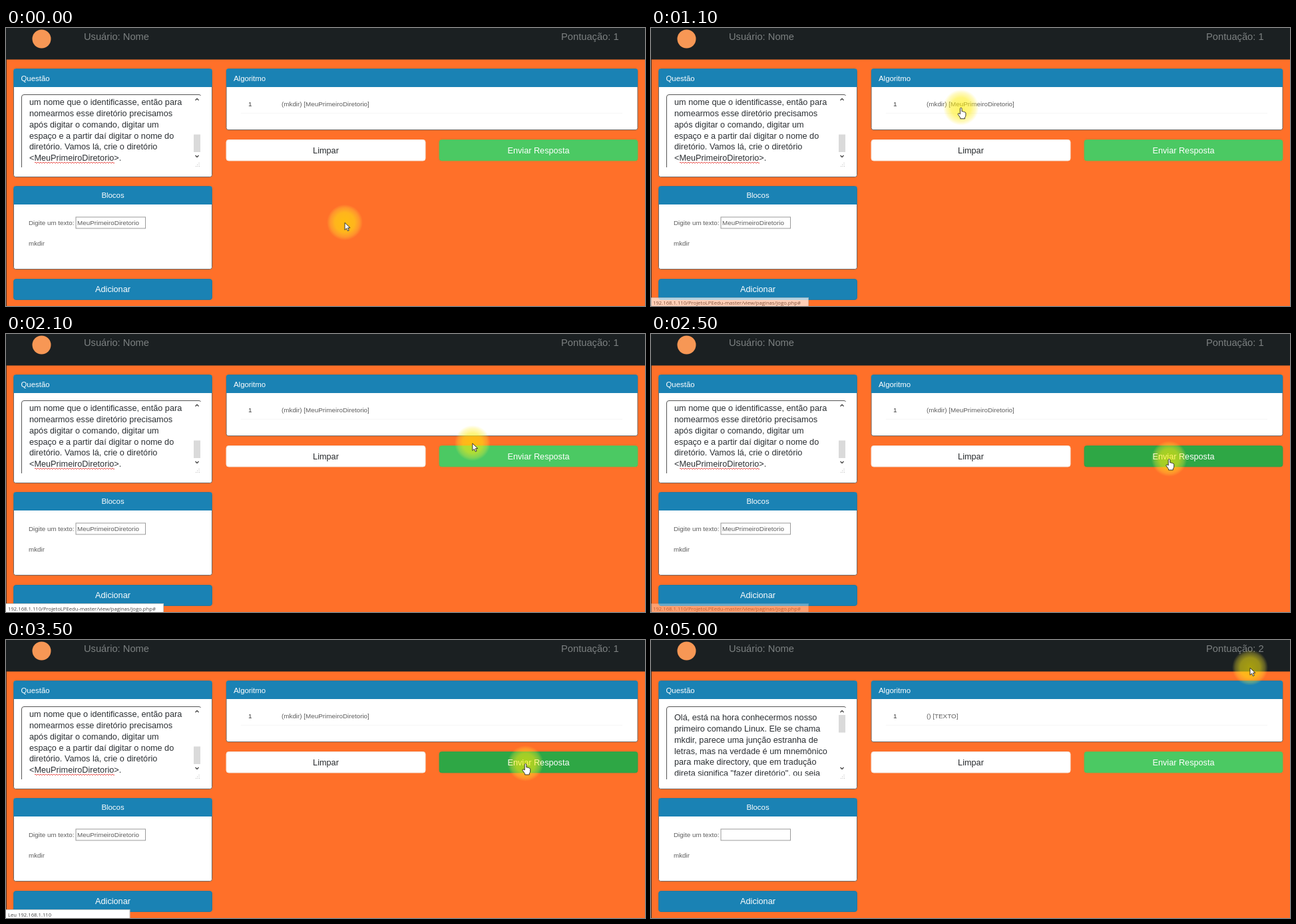
Write an HTML page that moves like this. It is 960 px wide and 419 px high and loops after 5100 ms.

```html
<!DOCTYPE html>
<html lang="pt">
<head>
<meta charset="utf-8">
<style>
  html, body { margin: 0; width: 100%; height: 100%; overflow: hidden; background: #ff7029; }
  svg { display: block; width: 960px; height: 419px; }
  text { font-family: "Liberation Sans", Arial, sans-serif; white-space: pre; }
  .nav { font-size: 14.7px; fill: #7c8081; }
  .head { font-size: 11.4px; fill: #fff; }
  .body { font-size: 12.7px; fill: #2b2f33; }
  .small { font-size: 9.85px; fill: #5c5c5c; }
  .btn { font-size: 12.7px; text-anchor: middle; fill: #fff; }
  .status text { font-family: "Open Sans", "Noto Sans", sans-serif; font-size: 7.7px; fill: #444; }
  .status rect { fill: #fff; stroke: #c4c4c4; }
</style>
</head>
<body>
<svg viewBox="0 0 960 419">
  <defs>
    <radialGradient id="glow">
      <stop offset="0" stop-color="#ffed00" stop-opacity=".62"/>
      <stop offset=".55" stop-color="#ffed12" stop-opacity=".55"/>
      <stop offset=".82" stop-color="#ffed30" stop-opacity=".3"/>
      <stop offset="1" stop-color="#ffed40" stop-opacity="0"/>
    </radialGradient>
    <clipPath id="textArea"><path d="M24 106.500H281V204.500H24Z"/></clipPath>
  </defs>

  <rect width="960" height="419" fill="#ff7029"/>
  <path d="M.5 47V419" stroke="#4a3024"/>
  <rect width="960" height="47.500" fill="#1b2022"/>
  <circle cx="53.500" cy="16.500" r="14" fill="#f79755"/>
  <text class="nav" x="117" y="18">Usuário: Nome</text>
  <text class="nav" id="score" x="834" y="18"></text>

  <g id="panels"></g>
  <text class="head" x="22.500" y="79.500">Questão</text>
  <text class="head" x="342" y="79.500">Algoritmo</text>
  <text class="head" x="160.500" y="256" text-anchor="middle">Blocos</text>

  <path d="M23.500 210V104Q23.500 100.500 27 100.500H290Q292 100.500 292.500 102" fill="none" stroke="#555"/>
  <g clip-path="url(#textArea)">
    <g class="body" id="pageA"></g>
    <g class="body" id="pageB"></g>
  </g>
  <path id="squiggle" fill="none" stroke="#e8403c" stroke-width=".9"/>
  <rect id="thumb" x="282" width="10" height="26.500" fill="#dadada"/>
  <path d="M284.500 109L287 106.500L289.500 109M284.500 192L287 194.500L289.500 192" fill="none" stroke="#444" stroke-width="1.300"/>
  <path d="M285 208.500H292M287 206H292M289.500 203.500H292" stroke="#bbb" stroke-dasharray="1 1.500"/>

  <text class="small" x="34" y="297">Digite um texto:</text>
  <rect x="105" y="285" width="104.500" height="17" fill="#fff" stroke="#9a9a9a"/>
  <text class="small" id="input" x="107" y="297">MeuPrimeiroDiretorio</text>
  <text class="small" x="34" y="327.500">mkdir</text>

  <text class="small" x="364" y="118" style="fill:#333">1</text>
  <text class="small" id="step" x="414" y="118"></text>
  <path d="M353 128.500H926" stroke="#f6f6f6"/>

  <rect id="clear" x="331" y="168.500" width="299" height="31.500" rx="3.500" stroke="#f2e9e4"/>
  <text class="btn" x="480.500" y="189" style="fill:#26292c">Limpar</text>
  <rect id="send" x="651" y="168.500" width="298" height="31.500" rx="3.500"/>
  <text class="btn" x="800" y="189">Enviar Resposta</text>
  <rect x="11.500" y="378.500" width="298" height="31" rx="3.500" fill="#1a82b4" stroke="#2d7698"/>
  <text class="btn" x="160.500" y="398">Adicionar</text>

  <g class="status" id="link">
    <rect x="-.5" y="406.500" width="237" height="14"/>
    <text x="3" y="416.500">192.168.1.110/ProjetoLPEedu-master/view/paginas/jogo.php#</text>
  </g>
  <g class="status" id="read">
    <rect x="-.5" y="406.500" width="186.500" height="14"/>
    <text x="3" y="416.500">Leu 192.168.1.110</text>
  </g>

  <g id="pointer">
    <circle r="27" fill="url(#glow)"/>
    <path id="arrow" d="M0 .5V11.300L2.600 8.900L4.400 12.800L6.200 12L4.500 8.200H8Z" fill="#fff" stroke="#222" stroke-width=".9"/>
    <path id="hand" d="M-1.300 10V1.800Q-1.200 .5 0 .5Q1.200 .5 1.300 1.800V6Q2.800 5.300 3.600 6.500Q5 6 5.600 7.300Q7 7 7.200 8.500V12Q7 14 5.800 15V17H-1V15.500L-4.500 10.500Q-4.800 8.500-3 9Z" fill="#fff" stroke="#222" stroke-width=".9"/>
  </g>
</svg>
<script>
const LOOP = 5100, STEP = 100, RELOAD = 4500;
const $ = id => document.getElementById(id);

const panel = (x, y, w, h) => `
  <rect x="${x}" y="${y}" width="${w}" height="${h}" rx="3" fill="#fff" stroke="#6d6460"/>
  <path d="M${x} ${y + 27.5}v-24.5q0-3 3-3h${w - 6}q3 0 3 3v24.500z" fill="#1a82b4"/>`;
$('panels').innerHTML = panel(11.5, 61.5, 298, 163) + panel(11.5, 238.5, 298, 125) + panel(331, 61.5, 618, 92);

const lines = (rows, y) => rows.map((row, i) =>
  `<text x="35" y="${y + i * 16.75}">${row}</text>`).join('');
$('pageA').innerHTML = lines([
  'um nome que o identificasse, então para',
  'nomearmos esse diretório precisamos',
  'após digitar o comando, digitar um',
  'espaço e a partir daí digitar o nome do',
  'diretório. Vamos lá, crie o diretório',
  '&lt;MeuPrimeiroDiretorio&gt;.'], 116.3);
$('pageB').innerHTML = lines([
  'Olá, está na hora conhecermos nosso',
  'primeiro comando Linux. Ele se chama',
  'mkdir, parece uma junção estranha de',
  'letras, mas na verdade é um mnemônico',
  'para make directory, que em tradução',
  'direta significa "fazer diretório", ou seja'], 121.3);
$('squiggle').setAttribute('d', 'M43 203' + 'q1 -2 2 0t2 0'.repeat(30));

// Pointer stops: time, x, y
const path = [
  [0, 509, 293], [600, 406, 158], [1200, 470, 117], [1600, 511, 117], [1750, 514, 117],
  [2300, 778, 184], [2500, 778.5, 188], [3500, 780.5, 186], [4400, 780.5, 186],
  [RELOAD, 834, 112], [5000, 900, 41.5]
];
const clamp = v => Math.max(0, Math.min(1, v));
const mix = (a, b, k) => a + (b - a) * k;
const fade = (t, on, off, span = 150) => Math.min(clamp((t - on) / span), clamp(1 - (t - off) / span));
const blend = (a, b, k) => `rgb(${a.map((v, i) => Math.round(mix(v, b[i], k)))})`;
const show = (id, on) => $(id).setAttribute('opacity', +on);

function pointerAt(t) {
  const i = path.findIndex((p, n) => n === path.length - 1 || t < path[n + 1][0]);
  const [t0, x0, y0] = path[i], [t1, x1, y1] = path[i + 1] || [t0 + 1, x0, y0];
  const k = (1 - Math.cos(Math.PI * clamp((t - t0) / (t1 - t0)))) / 2;
  return [mix(x0, x1, k), mix(y0, y1, k)];
}

function draw(t) {
  const solved = t >= RELOAD;
  const [x, y] = pointerAt(t);
  const onRow = y > 102 && y < 128;
  const onButton = y > 168 && y < 200 && (x < 630 || x > 651);
  const hand = onRow || onButton;

  $('pointer').setAttribute('transform', `translate(${x} ${y})`);
  show('hand', hand);
  show('arrow', !hand);

  $('score').textContent = `Pontuação: ${solved ? 2 : 1}`;
  $('step').textContent = solved ? '() [TEXTO]' : '(mkdir) [MeuPrimeiroDiretorio]';
  $('thumb').setAttribute('y', solved ? 113 : 160.5);
  for (const id of ['pageA', 'squiggle', 'input']) show(id, !solved);
  show('pageB', solved);

  $('clear').setAttribute('fill', blend([255, 255, 255], [226, 230, 234], fade(t, 370, 495)));
  $('send').setAttribute('fill', blend([75, 201, 99], [46, 167, 69], solved ? 0 : fade(t, 2250, LOOP)));
  $('send').setAttribute('stroke', solved || t < 2250 ? '#62b955' : '#3a9a46');
  show('link', 0);
  $('link').setAttribute('opacity', fade(t, 1000, 2400));
  show('read', t >= 3200 && !solved);
}

function tick(now) {
  draw(Math.floor(now % LOOP / STEP) * STEP);
  requestAnimationFrame(tick);
}
draw(0);
requestAnimationFrame(tick);
</script>
</body>
</html>
```
